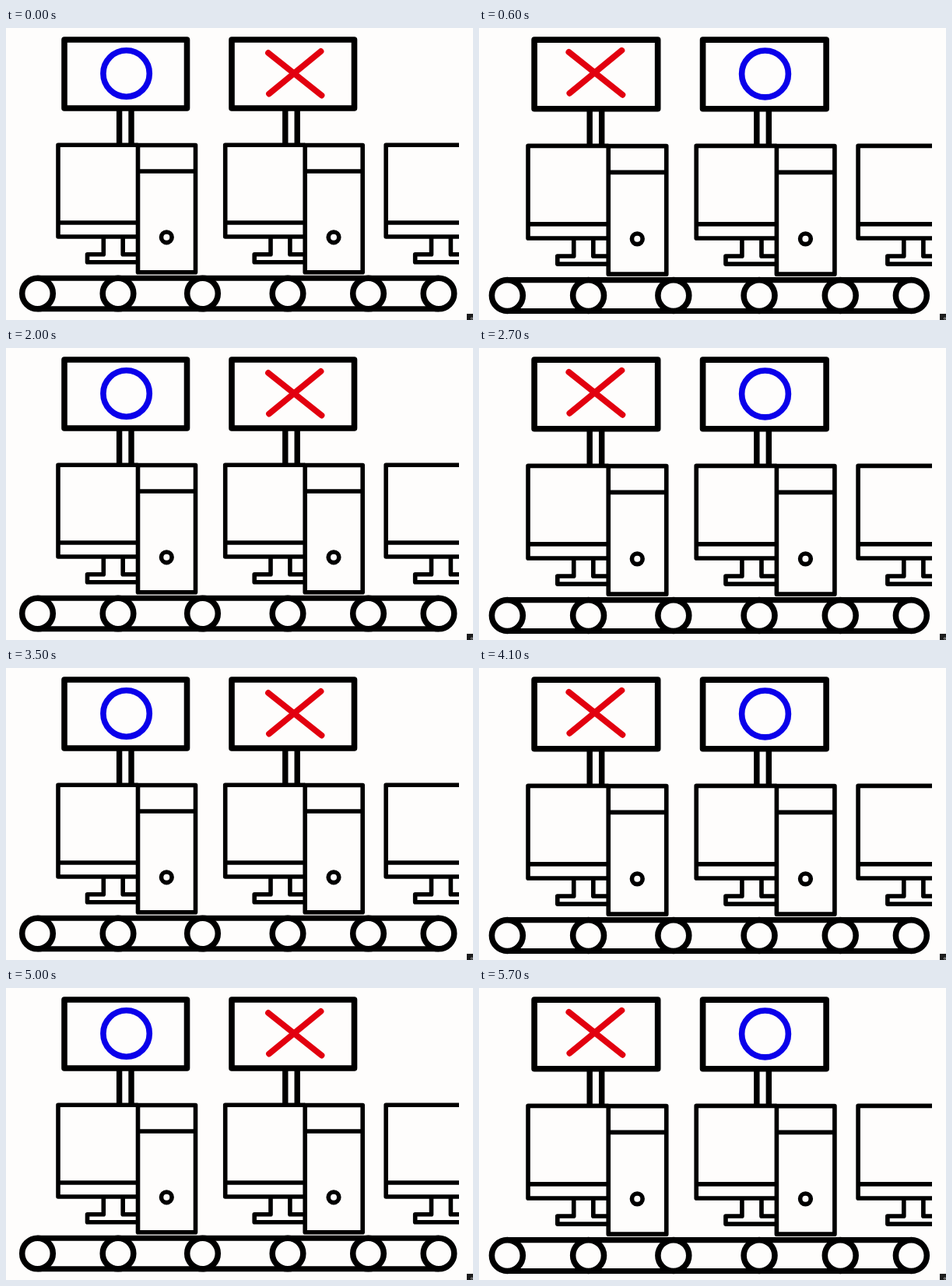
An HTML page for the animation above (5.8 s loop, 600 px wide and 375 px high).

```html
<!DOCTYPE html>
<html lang="en">
<head>
<meta charset="utf-8">
<title>Conveyor check</title>
<style>
  html, body { margin: 0; width: 100%; height: 100%; overflow: hidden; background: #fefdfc; }
  svg { display: block; width: 600px; height: 375px; }
</style>
</head>
<body>
<svg viewBox="0 0 600 375" fill="none" stroke="#000">
  <defs>
    <clipPath id="view"><rect width="582" height="375"/></clipPath>
    <g id="computer" stroke-width="5.6" stroke-linejoin="round">
      <path d="M169.5 150.2H67V268H169.5M67 250H169.5"/>
      <path d="M125.3 268V290.8H104.5V300.8H169.5M150.2 268V290.8H169.5"/>
      <path d="M169.5 150.5H243.5V313.8H169.5ZM169.5 184H243.5"/>
      <circle cx="206.3" cy="268.8" r="6.8"/>
    </g>
    <path id="board" d="M75 15H232.5V103H75Z" stroke-width="7.6" stroke-linejoin="round"/>
    <path id="post" d="M145.6 103V150M161 103V150" stroke-width="7.4"/>
  </defs>
  <g clip-path="url(#view)">
    <g id="scene">
      <use href="#board"/>
      <use href="#board" x="215"/>
      <use href="#post"/>
      <use href="#post" x="213.2"/>
      <use href="#computer"/>
      <use href="#computer" x="214.7"/>
      <use href="#computer" x="421.2"/>
      <g id="belt">
        <path d="M40.5 321.2H556M40.5 360.8H556" stroke-width="7"/>
      </g>
      <circle id="pass" cx="154.6" cy="58.5" r="29.7" stroke="#0a00ea" stroke-width="7.6"/>
      <path id="fail" d="M337 32L405.5 86.5M338 84.5L404.5 30" stroke="#e2000f" stroke-width="7.8" stroke-linecap="round"/>
    </g>
  </g>
  <rect x="592" y="367" width="8" height="8" fill="#1c1c1c" stroke="none"/>
  <circle cx="598.5" cy="373" r="1.2" stroke="#aaa" stroke-width=".8"/>
</svg>
<script>
  const LOOP = 5800, STEP = 100, BEAT = 750, LEAD = 200;
  const get = id => document.getElementById(id);
  const scene = get('scene'), pass = get('pass'), fail = get('fail');

  for (const x of [40.5, 144, 252.5, 362, 465.5, 556]) {
    const wheel = document.createElementNS('http://www.w3.org/2000/svg', 'circle');
    const attrs = { cx: x, cy: 341, r: 19.8, fill: '#fefdfc', 'stroke-width': 7.5 };
    for (const key in attrs) wheel.setAttribute(key, attrs[key]);
    get('belt').append(wheel);
  }

  // The second pose is slightly larger, and the two marks trade places.
  function setPose(swapped) {
    scene.setAttribute('transform', swapped ? 'matrix(1.0068 0 0 1.0075 -4.4 0)' : '');
    pass.setAttribute('transform', swapped ? 'translate(214.8 0)' : '');
    fail.setAttribute('transform', swapped ? 'translate(-218 -1.4)' : '');
  }

  // Poses alternate on a steady beat, rounded to whole steps.
  function draw(ms) {
    const t = Math.floor((ms % LOOP) / STEP) * STEP;
    setPose(Math.floor((t + LEAD) / BEAT) % 2 === 1);
  }

  const start = performance.now();
  function tick() {
    draw(performance.now() - start);
    requestAnimationFrame(tick);
  }
  tick();
</script>
</body>
</html>
```
